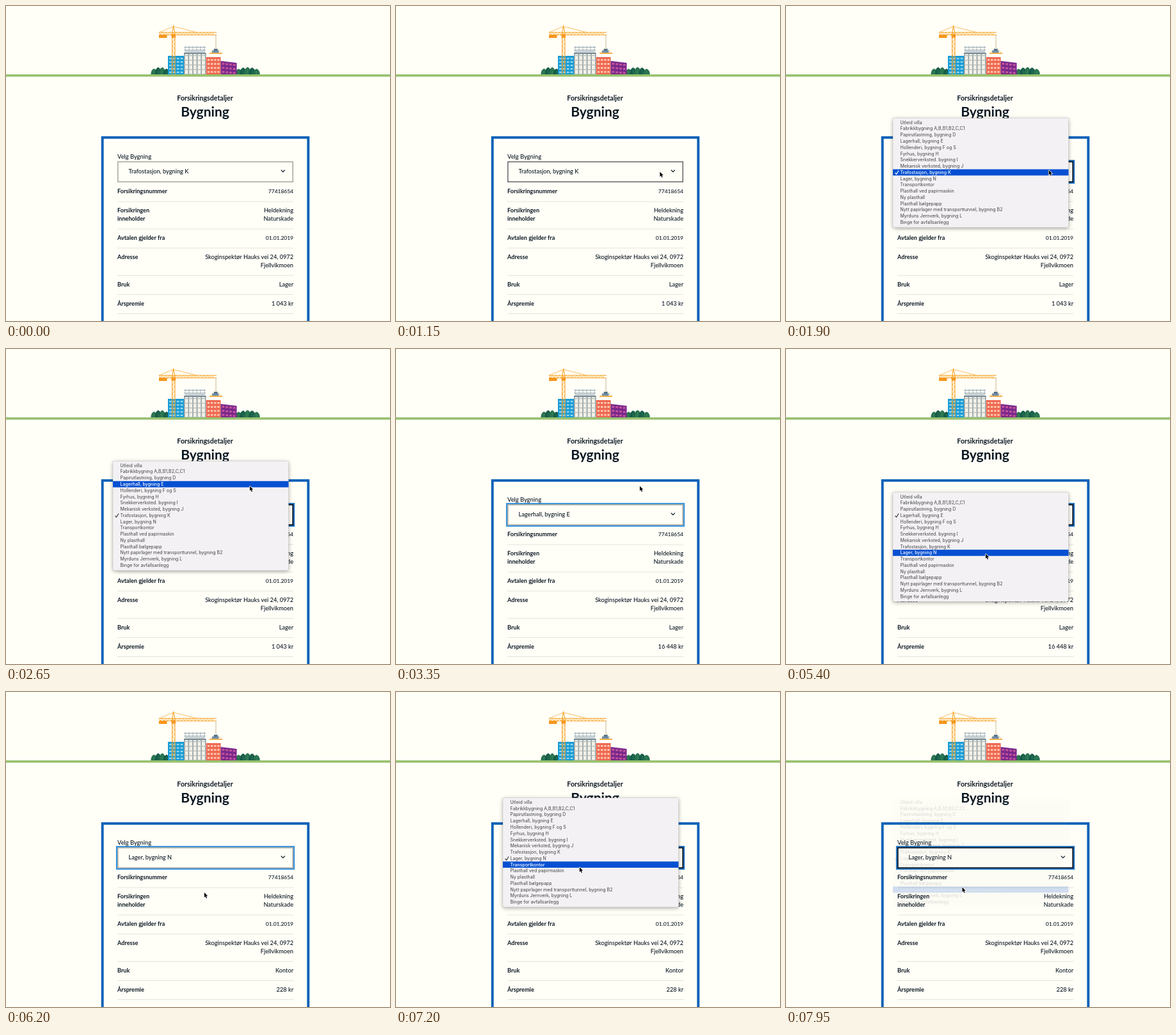
An HTML page with a canvas for the animation above (8000 ms loop, 600 by 493 pixels).

```html
<!DOCTYPE html>
<html lang="no">
<head>
<meta charset="utf-8">
<title>Forsikringsdetaljer</title>
<style>
html, body { margin: 0; width: 100%; height: 100%; overflow: hidden; background: #fffef7; }
canvas { display: block; width: 600px; height: 493px; }
</style>
</head>
<body>
<canvas id="stage"></canvas>
<script>
const W = 600, H = 493, LOOP = 8000;
const BG = '#fffef7', INK = '#0b1722', BLUE = '#0661b8', ORANGE = '#f7a326';
const LEFT = 174, RIGHT = 449, LINE = 13, GROUND = 107;
const PITCH = 9.76, FADE = 220, HOVER_LEAD = 400, PICK_LEAD = 250, COMMIT = 370;

const canvas = document.getElementById('stage');
const ctx = canvas.getContext('2d');
const dpr = window.devicePixelRatio || 1;
canvas.width = W * dpr;
canvas.height = H * dpr;

const items = [
  'Utleid villa', 'Fabrikkbygning A,B,B1,B2,C,C1', 'Papirutlastning, bygning D',
  'Lagerhall, bygning E', 'Hollenderi, bygning F og S', 'Fyrhus, bygning H',
  'Snekkerverksted. bygning I', 'Mekanisk verksted, bygning J', 'Trafostasjon, bygning K',
  'Lager, bygning N', 'Transportkontor', 'Plasthall ved papirmaskin', 'Ny plasthall',
  'Plasthall bølgepapp', 'Nytt papirlager med transporttunnel, bygning B2',
  'Myrduns Jernverk, bygning L', 'Binge for avfallsanlegg'
];

// Each menu shows the details chosen so far; the cursor goes from the field to an item
const menus = [
  { open: 1550, close: 2750, checked: 8, use: 'Lager', price: '1 043 kr', from: [412, 259], to: [380.5, 214] },
  { open: 4300, close: 5650, checked: 3, use: 'Lager', price: '16 448 kr', from: [377.5, 250], to: [311.5, 320] },
  { open: 7000, close: 7770, checked: 9, use: 'Kontor', price: '228 kr', from: [292, 258], to: [275, 305] }
];

const ENTER = [557, 330];
const moves = menus.flatMap(m => [
  { end: m.open - HOVER_LEAD, length: 500, to: m.from },
  { end: m.close - PICK_LEAD, length: Math.min(700, m.close - PICK_LEAD - m.open), to: m.to }
]);

const clamp = (v, lo, hi) => Math.max(lo, Math.min(hi, v));
const ease = u => u * u * (3 - 2 * u);

function cursorAt(t) {
  if (t < moves[0].end - moves[0].length) return null;
  return moves.reduce((p, { end, length, to }) => {
    const e = ease(clamp(1 - (end - t) / length, 0, 1));
    return p.map((v, i) => v + (to[i] - v) * e);
  }, ENTER);
}

function rect(x, y, w, h, color) {
  ctx.fillStyle = color;
  ctx.fillRect(x, y, w, h);
}

function poly(points, color) {
  ctx.fillStyle = color;
  ctx.beginPath();
  points.forEach(([x, y]) => ctx.lineTo(x, y));
  ctx.fill();
}

function line(points, color, width) {
  ctx.strokeStyle = color;
  ctx.lineWidth = width;
  ctx.beginPath();
  points.forEach(([x, y]) => ctx.lineTo(x, y));
  ctx.stroke();
}

function box(x, y, w, h, color, width) {
  ctx.strokeStyle = color;
  ctx.lineWidth = width;
  ctx.strokeRect(x, y, w, h);
}

function text(s, x, y, size, weight = 500, align = 'left', color = INK, family = 'Lato') {
  ctx.font = `${weight} ${size}px ${family}, sans-serif`;
  ctx.textAlign = align;
  ctx.fillStyle = color;
  ctx.fillText(s, x, y);
}

// Two parallel rails with a zigzag between them
function truss(x, y, w, h, step) {
  const along = w > h, n = Math.floor((along ? w : h) / step);
  const zig = Array.from({ length: n }, (_, i) =>
    along ? [x + i * step, y + i % 2 * h] : [x + i % 2 * w, y + i * step]);
  line(zig, ORANGE, .8);
  for (const side of [0, 1])
    line(along ? [[x, y + side * h], [x + w, y + side * h]]
               : [[x + side * w, y], [x + side * w, y + h]], ORANGE, 1.1);
}

function drawCrane() {
  truss(259.6, 42, 4.4, GROUND - 42, 3.5);
  truss(239, 41.2, 90, 4, 2.7);
  line([[240, 41], [261.5, 32], [297, 41]], ORANGE, .7);
  line([[259.6, 42], [261.5, 31.5], [264, 42]], ORANGE, 1.1);
  rect(239, 45, 12.5, 5, '#f5961d');
  rect(258.5, 44.5, 6.5, 5, '#f5961d');
  line([[328, 45], [328, 65]], '#b5a06a', .7);
  line([[319.5, 73.5], [328, 64.5], [336.5, 73.5]], '#d2b26d', .7);
  rect(322, 69.5, 10.5, 4, '#7190a8');
  rect(325, 67, 5.5, 3, '#4d718f');
  rect(318, 73.3, 20, 1.6, ORANGE);
}

function grove(x0, x1, count) {
  const step = (x1 - x0) / count;
  for (let i = 0; i < count; i++) {
    const x = x0 + (i + .5) * step;
    const r = step * .75, top = GROUND - 7.5 - 4 * Math.sin(Math.PI * (i + .5) / count);
    ctx.fillStyle = i % 2 ? '#165c48' : '#28734f';
    ctx.beginPath();
    ctx.moveTo(x - r, GROUND);
    ctx.quadraticCurveTo(x - r, top + 2, x, top);
    ctx.quadraticCurveTo(x + r, top + 2, x + r, GROUND);
    ctx.fill();
    line([[x, GROUND], [x, top + 3]], '#4f9068', .5);
  }
}

function house(x, y, w, floors, color, glass, slope = 0) {
  poly([[x, y], [x + w, y + slope], [x + w, GROUND], [x, GROUND]], color);
  const dx = (w - 2) / 4, dy = (GROUND - y - 2) / floors;
  for (let r = 0; r < floors; r++)
    for (let c = 0; c < 4; c++)
      rect(x + 2 + c * dx, y + 3 + r * dy + c * slope / 5, dx * .65, dy * .45, glass);
}

function drawOffice() {
  rect(278, 74, 34.5, 33, '#f2f1e7');
  for (let i = 0; i < 6; i++) {
    rect(278 + i * 6.6, 74, 1.5, 33, '#8a98a0');
    line([[280 + i * 6, 63], [280 + i * 6, 74]], '#8fa0aa', .8);
  }
  for (let y = 77; y < GROUND; y += 7.3) rect(278, y, 34.5, 1.2, '#b1b9b7');
  for (let y = 64; y < 74; y += 4.5) rect(278.5, y, 33.5, 1, '#94a6af');
  rect(281, 69.5, 29, 4, '#c9d2d4');
  rect(278, 73.3, 34.5, 1.8, '#718591');
}

function drawTown() {
  grove(228, 254, 4);
  grove(360, 395, 5);
  house(253, 78, 25.5, 5, '#169bd7', '#96d5e8');
  drawOffice();
  house(312.8, 80, 22.7, 4, '#ef6752', '#fbcbae');
  house(335.5, 86, 25, 3, '#78298c', '#c8559a', 3);
  drawCrane();
  rect(0, GROUND, W, 3.6, '#98c16e');
}

function drawSelect(t, cursor, label) {
  const open = menus.some(m => t >= m.open && t < m.close + FADE);
  const over = cursor && cursor[0] > LEFT && cursor[0] < RIGHT && Math.abs(cursor[1] - 259.5) < 16.5;
  if (t >= menus[0].open)
    box(173.2, 242.2, 276.6, 34.6, open ? '#1d70bf' : '#3793df', 2.6);
  rect(LEFT, 243, 275, 33, BG);
  box(174.8, 243.8, 273.4, 31.4, open ? '#06101c' : over ? '#777673' : '#b3afa1', 1.7);
  text(label, 191.5, 262, 9.2);
  line([[429.8, 256.6], [432.8, 259.6], [435.8, 256.6]], INK, 1.3);
}

function drawRows({ use, price }) {
  const rows = [
    ['Forsikringsnummer', '77418654'],
    ['Forsikringen\ninneholder', 'Heldekning\nNaturskade'],
    ['Avtalen gjelder fra', '01.01.2019'],
    ['Adresse', 'Skoginspektør Hauks vei 24, 0972\nFjellvikmoen'],
    ['Bruk', use],
    ['Årspremie', price]
  ];
  let y = 293.3;
  for (const [label, value] of rows) {
    const lines = value.split('\n');
    const size = /^[\d.]+$/.test(value) ? 8.45 : 9.2;
    label.split('\n').forEach((s, i) => text(s, LEFT, y + i * LINE, 9.1, 700));
    lines.forEach((s, i) => text(s, RIGHT, y + i * LINE, size, 500, 'right'));
    const height = lines.length * LINE;
    rect(LEFT, y + height - .6, RIGHT - LEFT, .8, '#dedcd5');
    y += height + 16.9;
  }
}

function drawPage(t, cursor) {
  rect(0, 0, W, H, BG);
  drawTown();
  text('Forsikringsdetaljer', 311, 148.3, 10.6, 700, 'center');
  text('Bygning', 311, 173, 21, 700, 'center');
  box(150.7, 205.8, 321.6, 320, BLUE, 3.9);
  text('Velg Bygning', LEFT, 238.5, 9.3);
  const chosen = menus.findLast((m, i) => i === 0 || t >= menus[i - 1].close + COMMIT);
  drawSelect(t, cursor, items[chosen.checked]);
  drawRows(chosen);
}

function activeRow(menu, [x, y], first) {
  const moved = Math.hypot(x - menu.from[0], y - menu.from[1]) > .5;
  return moved ? clamp(Math.round((y - first) / PITCH), 0, items.length - 1) : menu.checked;
}

function drawMenu(menu, t, cursor) {
  const first = 260.4 - menu.checked * PITCH;
  const active = activeRow(menu, cursor, first);
  const alpha = clamp(1 - (t - menu.close) / FADE, 0, 1);
  const x = 167, w = 274.5, top = first - 6.9, h = items.length * PITCH + 5.2;

  ctx.save();
  ctx.globalAlpha = alpha * alpha;
  ctx.shadowColor = 'rgba(0,0,0,.34)';
  ctx.shadowBlur = 6 * dpr;
  ctx.shadowOffsetY = 1.5 * dpr;
  ctx.fillStyle = '#f3f1f3';
  ctx.beginPath();
  ctx.roundRect(x, top, w, h, 3);
  ctx.fill();
  ctx.shadowColor = 'transparent';
  box(x, top, w, h, 'rgba(120,120,125,.3)', .5);

  ctx.globalAlpha = alpha;
  rect(x, first + (active - .5) * PITCH, w, PITCH, '#0550d2');
  items.forEach((s, i) => {
    const y = first + i * PITCH, on = i === active;
    const color = on ? '#fff' : '#414143';
    text(s, 178.5, y + 2.4, 7, on ? 500 : 400, 'left', color, 'Inter');
    if (i === menu.checked)
      line([[170.5, y + .5], [172.5, y + 2.8], [176, y - 2.8]], color, 1.2);
  });
  ctx.restore();
}

function drawCursor([x, y]) {
  const shape = [[0, 0], [0, 7.6], [1.7, 6.1], [2.9, 9], [4.2, 8.4], [3, 5.7], [5.3, 5.5]];
  ctx.save();
  ctx.translate(x + .4, y + .4);
  ctx.lineJoin = 'round';
  line([...shape, shape[0]], '#fff', 1.5);
  poly(shape, '#000');
  ctx.restore();
}

function frame(ms) {
  const t = ms % LOOP;
  const cursor = cursorAt(t);
  ctx.setTransform(dpr, 0, 0, dpr, 0, 0);
  drawPage(t, cursor);
  const menu = menus.find(m => t >= m.open && t < m.close + FADE);
  if (menu) drawMenu(menu, t, cursor);
  if (cursor) drawCursor(cursor);
}

const begin = performance.now();
function tick() {
  frame(performance.now() - begin);
  requestAnimationFrame(tick);
}
tick();
</script>
</body>
</html>
```
